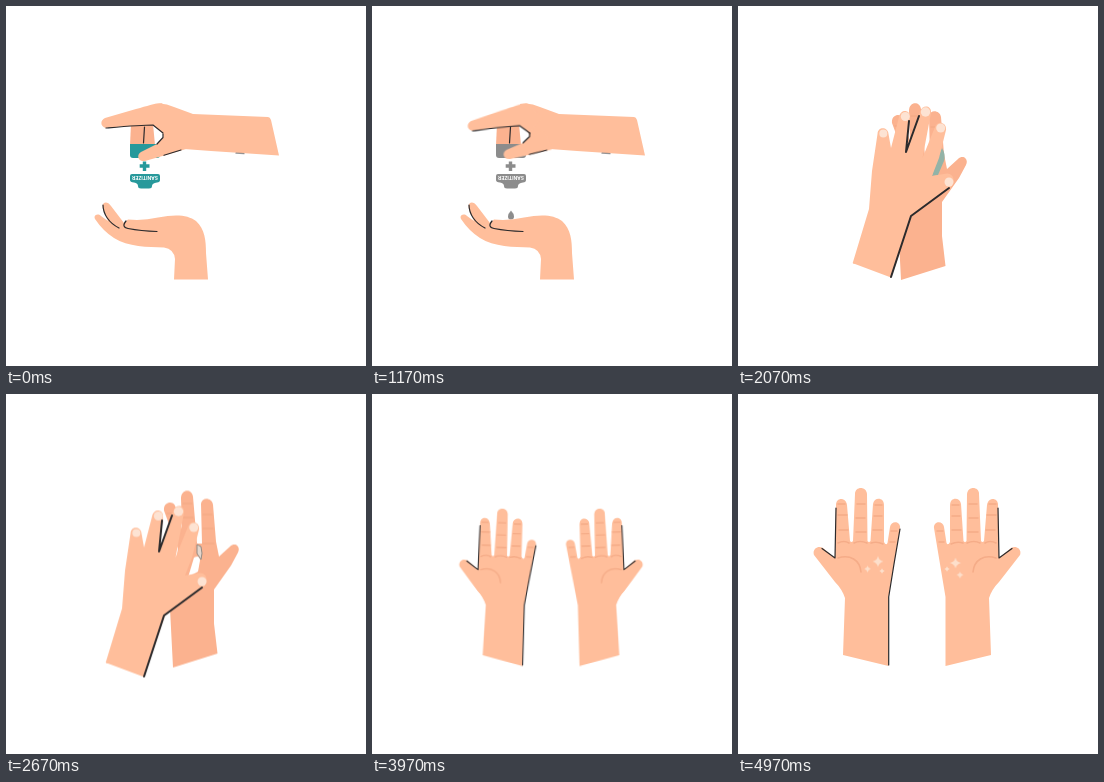
Animation of 360 by 360 pixels, one loop 5 s. Source, as an HTML page:

```html
<!DOCTYPE html>
<html lang="en">
<head>
<meta charset="utf-8">
<title>Hand sanitizing</title>
<style>
  html, body { margin: 0; width: 100%; height: 100%; overflow: hidden; background: #fff; }
  svg { display: block; width: 100vw; height: 100vh; }

  .skin { fill: #ffbe9b; }
  .shade { fill: #fbb28f; }
  .line { fill: none; stroke: #2b2a2c; stroke-width: 1.2; stroke-linecap: round; stroke-linejoin: round; }
  .crease { fill: none; stroke: #f5ac88; stroke-width: 1.6; stroke-linecap: round; }
  .nail { fill: #fde3d3; }
  .label { font: 700 4.9px Inter, Arial, sans-serif; fill: #fff; text-anchor: middle; }

  .dispense, .index, .thumb, .bottle, .drop, .rub, .front, .back, .gel, .ring, .palms, .palm, .spark {
    animation: 5s linear infinite;
  }
  .dispense { animation-name: leave; }
  .index { transform-origin: 160px 110px; animation-name: pinch; animation-timing-function: ease-in-out; }
  .thumb { transform-origin: 172px 140px; animation-name: press; animation-timing-function: ease-in-out; }
  .bottle { fill: #27999b; animation-name: tint; }
  .drop { animation-name: fall; }
  .rub { animation-name: rub; }
  .front { animation-name: front; animation-timing-function: ease-in-out; }
  .back { animation-name: back; animation-timing-function: ease-in-out; }
  .gel { fill: #93b3a7; animation-name: gel; }
  .ring { animation-name: ring; }
  .palms { animation-name: palms; }
  .palm { transform-origin: 150px 272px; animation-name: grow; }
  .spark { fill: #fddfcb; transform-box: fill-box; transform-origin: center; animation-name: spark; }

  @keyframes leave {
    0%, 27% { transform: none; visibility: visible; animation-timing-function: cubic-bezier(.33, 0, .67, .33); }
    36.6% { transform: translateX(-285px); visibility: visible; }
    36.7%, 100% { transform: translateX(-285px); visibility: hidden; }
  }
  @keyframes pinch {
    0%, 100% { transform: none; }
    9% { transform: rotate(-2.4deg); }
    13% { transform: rotate(-.4deg); }
    19%, 24% { transform: rotate(-2.8deg); }
    27% { transform: rotate(-1deg); }
  }
  @keyframes press {
    0%, 100% { transform: none; }
    9% { transform: rotate(2.8deg); }
    13% { transform: rotate(.4deg); }
    19%, 24% { transform: rotate(3.4deg); }
    27% { transform: rotate(1deg); }
  }
  @keyframes tint {
    0%, 21.9% { fill: #27999b; }
    22%, 100% { fill: #8c8c8c; }
  }
  @keyframes fall {
    0%, 16% { transform: translateY(-28px); opacity: 0; }
    16.1% { transform: translateY(-28px); opacity: 1; animation-timing-function: cubic-bezier(.33, 0, .67, .33); }
    23.4% { transform: none; opacity: 1; }
    24.6% { transform: translateY(5px); opacity: 1; }
    24.7%, 100% { transform: translateY(5px); opacity: 0; }
  }
  @keyframes rub {
    0%, 36.8% { opacity: 0; }
    40.5%, 64.6% { opacity: 1; }
    67.8%, 100% { opacity: 0; }
  }
  @keyframes front {
    0%, 41.4%, 48.8%, 58.8% { transform: none; }
    44% { transform: translate(-15px, 14px); }
    53.6%, 63.8% { transform: translate(-15px, 11.5px); }
    68%, 100% { transform: translate(-6px, 5px); }
  }
  @keyframes back {
    0%, 41.4%, 48.8%, 58.8% { transform: none; }
    44% { transform: translate(6px, -1px); }
    53.6%, 63.8% { transform: translate(4px, -.5px); }
    68%, 100% { transform: none; }
  }
  @keyframes gel {
    0%, 42% { opacity: 1; }
    47%, 100% { opacity: 0; }
  }
  @keyframes ring {
    0%, 42% { opacity: 0; }
    47%, 100% { opacity: 1; }
  }
  @keyframes palms {
    0%, 69.3% { opacity: 0; }
    72.5%, 100% { opacity: 1; }
  }
  @keyframes grow {
    0%, 69.3% { transform: rotate(8deg) scale(.5); }
    74.6% { transform: rotate(4deg) scale(.72); }
    79.4% { transform: rotate(1.6deg) scale(.88); }
    85.4% { transform: rotate(.6deg) scale(.985); }
    91%, 100% { transform: none; }
  }
  @keyframes spark {
    0%, 86% { transform: scale(0); }
    92%, 100% { transform: none; }
  }
</style>
</head>
<body>
<svg viewBox="0 0 360 360">
  <defs>
    <path id="star" d="M0-5.5Q1-1 5.5 0Q1 1 0 5.5Q-1 1-5.5 0Q-1-1 0-5.5Z"/>
    <g id="palmShape">
      <path class="skin" d="M76 161C74 155 80 151 85 154L97 164L98 111C98 103 108 103 109 111L112 147Q113.500 149 115 147L117 100C117 92 128.500 92 129 100L129.500 147Q131 149 132.500 147L135 110C136 103 146 103 146 111L146 148Q148 152 149.500 149L152 133C153 126 163 127 162 134L156 170L150.500 203V272L105 261L107 204Q104 195 97 188Z"/>
      <path class="crease" d="M100 110H107M100 121H109M101 136H110M119 110H127M118 124H127M118 138H128M137 111H144M136 122H144M135 136H144M153 137H159M152 148H157M100 149Q106 146 111 149M116 149Q122 146 129 149M133 149Q139 147 145 150M100 164C112 160 122 166 123 178"/>
      <path class="line" d="M98 114L97 164L84 154.500"/>
    </g>
  </defs>

  <g class="dispense">
    <path class="shade" d="M125 118H147L149 139H124Z"/>
    <path class="line" d="M138.500 121L137.500 137"/>
    <g class="bottle">
      <path d="M124 138H154V149Q154 152 151 152H127Q124 152 124 149Z"/>
      <path d="M136.800 155.500H140.200V158.300H143.500V161.700H140.200V165H136.800V161.700H133.700V158.300H136.800Z"/>
      <path d="M126 168H152Q154 168 154 170V174Q154 176 151 176.500Q146 177 146 180Q146 182.500 143 182.500H135Q132 182.500 132 180Q132 177 128 176.500Q124 176 124 174V170Q124 168 126 168Z"/>
      <path class="drop" d="M139 204.500Q142 207.500 142 210.500Q142 213.500 139 213.500Q136 213.500 136 210.500Q136 207.500 139 204.500Z"/>
    </g>
    <text class="label" transform="translate(139 170.400) rotate(180)">SANITIZER</text>

    <path class="skin" d="M148 98Q158 96 168 101L187 108L262 111Q264 111 265 114L273 149.500L205 145L178 143L160 148L157 128L150 118Z"/>
    <g class="index">
      <path class="skin" d="M156 97.300C149 97 142 100 130 103L99 112C94 114 94 121 100 122C112 121 135 119 147 119L157 127L170 112Z"/>
      <path class="line" d="M100 122C112 121 135 119 147 119L157 127"/>
    </g>
    <g class="thumb">
      <path class="skin" d="M158 131L151 138L135 146C130 149 132 156 139 155L160 149L180 143L172 125Z"/>
      <path class="line" d="M157 128V131.500L151 138M158 149.300L175 144"/>
    </g>
    <path class="line" d="M230 147.200L238 147.700" stroke-opacity=".5"/>

    <path class="skin" d="M89 213C87 209 92 207 95 210L102 215L97 203C95 196 101 194 105 200L118 217L122 213.500Q137 215 152 211.500C170 208 182 209 190 215C199 223 200 235 200 247L202 273.500H168L169 253Q168 243 158 241.500C142 241 122 241 108 232Q97 225 89 213Z"/>
    <path class="line" d="M97 199C97 208 103 217 113 222M120 215Q115 221 122 222.500Q135 225 151 225.500"/>
  </g>

  <g class="rub">
    <g class="back">
      <path class="shade" d="M168 155L154 117C153 108 163 107 165 112L172 135L171 105C171 95 182 95 183 103L187 150H192L191 110C192 103 202 104 203 111L206 148L209 163L220 153C225 148 231 153 228 159L221 172L204 196L204 230L207.500 260L163 274L160 215Z"/>
      <path class="crease" d="M173 110H182M173 124H183M193 121H202M193 135H203M193 150H204M157 120H164"/>
      <path class="gel" d="M204 142Q208 148 206 155L200 169L194 170Q197 157 204 142Z"/>
      <g class="ring">
        <path fill="#fff" d="M178 184L184 164Q190 161 190 167L188 178Z"/>
        <path fill="#e5d6cc" stroke="#8f8983" d="M187 151L191 153Q193 160 191 166L187 160Z"/>
      </g>
    </g>
    <g class="front">
      <path class="skin" d="M115 256L131 203L134 165L139.500 128C140 120 150 121 150.500 128L153 142L161 111C163 102 173 104 172 112L168 146L182 106C184 98 194 99 193 107L184.500 152L197 121C199 114 209 116 208 124L201 152L194 170L206 168C214 165 219 174 213 181L174 210L153 271.500L117 258Q114 258 115 256Z"/>
      <path class="line" style="stroke-width:2" d="M153 271L173 210L211 182M171 115L168 146L181 110"/>
      <g class="nail">
        <circle cx="145.300" cy="127.500" r="4"/>
        <circle cx="167.300" cy="110.500" r="4.500"/>
        <circle cx="187.500" cy="106" r="4.700"/>
        <circle cx="202.700" cy="122" r="4.500"/>
        <circle cx="211" cy="176" r="4.500"/>
      </g>
    </g>
  </g>

  <g class="palms">
    <g class="palm">
      <use href="#palmShape"/>
      <path class="line" d="M162 135L156 170L150.700 203V271"/>
    </g>
    <g transform="translate(358 0) scale(-1 1)">
      <g class="palm"><use href="#palmShape"/></g>
    </g>
    <g transform="translate(140 167.500)"><use class="spark" href="#star"/></g>
    <g transform="translate(129.500 175) scale(.6)"><use class="spark" href="#star"/></g>
    <g transform="translate(144 177) scale(.5)"><use class="spark" href="#star"/></g>
    <g transform="translate(217.500 169)"><use class="spark" href="#star"/></g>
    <g transform="translate(209 175) scale(.5)"><use class="spark" href="#star"/></g>
    <g transform="translate(222 181) scale(.6)"><use class="spark" href="#star"/></g>
  </g>
</svg>
</body>
</html>
```
